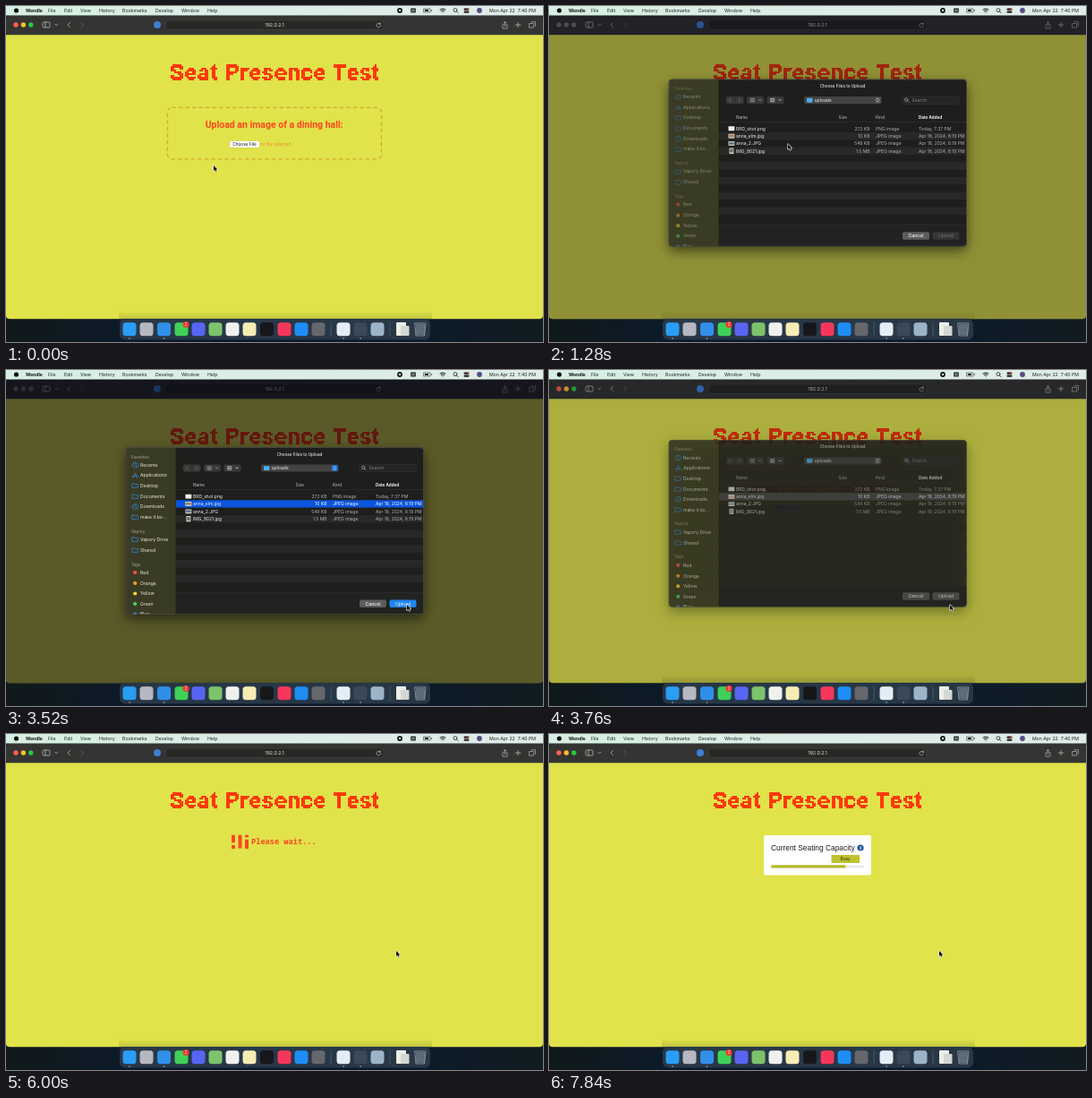
Animation, 600 px wide and 375 px high, one loop 8000 ms. Source, as an HTML page with a canvas:

```html
<!DOCTYPE html>
<html lang="en">
<head>
<meta charset="utf-8">
<title>Upload demo</title>
<style>
html, body { margin: 0; width: 100%; height: 100%; overflow: hidden; background: #0c1622; }
canvas { display: block; width: 600px; height: 375px; }
</style>
</head>
<body>
<canvas id="stage"></canvas>
<script>
const W = 600, H = 375, LOOP = 8000;
const OPEN = 1040, SELECT = 2400, CLOSE = 3640, WAIT = 4160, RESULT = 7360;
const UI = 'Inter, sans-serif', RED = '#fc3a0c', PAGE = '#e1e34b';
const cv = document.getElementById('stage'), c = cv.getContext('2d');
const dpr = window.devicePixelRatio || 1;
cv.width = W * dpr;
cv.height = H * dpr;

const clamp = v => Math.max(0, Math.min(1, v));
const ease = v => v * v * (3 - 2 * v);

function rect(x, y, w, h, fill, r = 0) {
  c.beginPath();
  c.roundRect(x, y, w, h, r);
  c.fillStyle = fill;
  c.fill();
}
function dot(x, y, r, fill) {
  c.beginPath();
  c.arc(x, y, r, 0, 7);
  c.fillStyle = fill;
  c.fill();
}
function path(d, color, x = 0, y = 0, w = .8) {
  c.save();
  c.translate(x, y);
  c.strokeStyle = color;
  c.lineWidth = w;
  c.lineCap = c.lineJoin = 'round';
  c.stroke(new Path2D(d));
  c.restore();
}
function text(s, x, y, size, fill, align = 'left', weight = 400, font = UI) {
  c.font = `${weight} ${size}px ${font}`;
  c.textAlign = align;
  c.fillStyle = fill;
  c.fillText(s, x, y);
}

// Heading: text set at half size, hardened to whole cells, shown doubled
function makeHeading() {
  const o = document.createElement('canvas');
  o.width = 130;
  o.height = 17;
  const g = o.getContext('2d');
  g.font = '700 13.5px Roboto, sans-serif';
  g.textAlign = 'center';
  g.fillStyle = RED;
  g.fillText('Seat Presence Test', 65, 11);
  const img = g.getImageData(0, 0, o.width, o.height);
  for (let i = 3; i < img.data.length; i += 4) img.data[i] = img.data[i] > 125 ? 255 : 0;
  g.putImageData(img, 0, 0);
  return o;
}
const heading = makeHeading();

function desktop() {
  const g = c.createLinearGradient(0, 0, W, 0);
  g.addColorStop(0, '#10191a');
  g.addColorStop(.25, '#0c1a2b');
  g.addColorStop(.75, '#0c1a2b');
  g.addColorStop(1, '#111c20');
  rect(0, 0, W, H, g);
}

function menuBar() {
  const g = c.createLinearGradient(0, 0, W, 0);
  g.addColorStop(0, '#d6efe2');
  g.addColorStop(1, '#e0ece8');
  rect(0, 0, W, 10.5, g);
  dot(11.5, 5, 2.6, '#111');
  text('Wendle', 22, 7, 5.1, '#111', 'left', 700);
  [['File', 47], ['Edit', 65], ['View', 83], ['History', 104], ['Bookmarks', 130],
   ['Develop', 167], ['Window', 196], ['Help', 225]].forEach(([s, x]) => text(s, x, 7, 5.2, '#1b211f'));
  dot(440, 5, 2.9, '#161a19');
  rect(439, 4, 2, 2, '#e0ece8');
  rect(452, 2.5, 6, 5, '#222', 1);
  path('M1 1.8H5M1 3.4H5', '#e0ece8', 452, 2.5, .6);
  path('M0 0H7V4H0Z M8.5 1.3V2.7', '#333', 467, 3, .6);
  rect(468, 4, 4, 2, '#222');
  path('M-3 -2Q0 -4.4 3 -2M-1.8 -.4Q0 -2 1.8 -.4M0 1.2V1.3', '#151515', 488, 6, 1);
  path('M4 2A2 2 0 1 1 0 2A2 2 0 1 1 4 2M3.5 3.5L5.2 5.2', '#222', 500, 2.6);
  rect(511.5, 2.5, 6, 2.3, '#222', 1.2);
  rect(511.5, 5.5, 6, 2.3, '#222', 1.2);
  dot(516.2, 3.6, 1, '#e33');
  dot(529, 5, 2.9, '#5b4a86');
  text('Mon Apr 22  7:40 PM', 592, 7, 5.2, '#1b211f', 'right');
}

function toolbar(active) {
  rect(0, 10.5, W, 23, '#343432', [4, 4, 0, 0]);
  ['#ff5f57', '#febc2e', '#28c840'].forEach((f, i) => dot(11 + i * 8.4, 21, 2.7, active ? f : '#77776f'));
  const ink = '#b7b7b3';
  path('M0 1Q0 0 1 0H7Q8 0 8 1V5Q8 6 7 6H1Q0 6 0 5Z M3 0V6', ink, 41, 18);
  path('M0 0L1.4 1.4L2.8 0', ink, 55, 20.4);
  path('M2.5 0L0 2.5L2.5 5', ink, 69, 18.5);
  path('M0 0L2.5 2.5L0 5', '#666663', 84, 18.5);
  dot(169, 21, 4, '#3d7fd6');
  rect(178, 15.8, 244, 10.6, '#454542', 3);
  rect(178.5, 16.3, 243, 9.6, '#282826', 2.6);
  text('192.0.2.1', 300, 23, 5.3, '#e8e8e4', 'center');
  path('M4 1A2.3 2.3 0 1 0 4.6 2.8M4.3 -.5V1.2H2.6', ink, 414, 19, .7);
  path('M1 2H0V6.5H5V2H4M2.5 4V-1M1 .3L2.5 -1.2L4 .3', ink, 555, 18.6, .7);
  path('M-2.7 0H2.7M0 -2.7V2.7', ink, 572, 21, .8);
  path('M0 0H4.6V4.6H0ZM2 -1.8H6.5V2.8', ink, 585, 19.5, .7);
}

function uploadForm(pressed) {
  c.setLineDash([4.5, 3]);
  c.strokeStyle = '#d0ac2c';
  c.lineWidth = 1.3;
  c.beginPath();
  c.roundRect(180.5, 113.3, 239, 57.5, 5);
  c.stroke();
  c.setLineDash([]);
  text('Upload an image of a dining hall:', 299.7, 135.5, 10.5, '#fb4722', 'center', 700, 'Roboto, sans-serif');
  rect(249.8, 150.6, 33.5, 7.8, '#c9c94a', 2);
  rect(250, 150.8, 33, 7.2, pressed ? '#8ea6ff' : '#fff', 1.8);
  text('Choose File', 266.5, 156.2, 4.8, '#111', 'center');
  text('no file selected', 284.5, 156.2, 4.7, '#f5802a');
}

// Three bars, each split by a gap that travels along it
function waiting(t) {
  for (let i = 0; i < 3; i++) {
    const x = 252 + i * 7.5, phase = (t / 1000 + .6 + i / 3) % 1;
    rect(x, 112.7, 4, 15.4, '#fb4722');
    c.save();
    c.beginPath();
    c.rect(x - .5, 112, 5, 17);
    c.clip();
    rect(x - .5, 110.2 + phase * 18.5, 5, 2.6, PAGE);
    c.restore();
  }
  text('Please wait...', 274, 123.2, 8.67, '#fb4722', 'left', 700, '"Noto Sans Mono", monospace');
}

function result() {
  rect(240, 113, 120, 44.5, '#fff', 2);
  text('Current Seating Capacity', 248, 130, 8.4, '#1c1c1c', 'left', 400, '"Liberation Sans", sans-serif');
  dot(348, 127, 3.6, '#245a9e');
  text('i', 348, 129.3, 6, '#fff', 'center', 700, '"Liberation Serif", serif');
  rect(315.5, 135, 31.5, 9, '#c0c12f', .6);
  text('Busy', 331.2, 141.2, 4.8, '#33330f', 'center');
  rect(248, 146.2, 104, 3.4, '#ececec', 1.5);
  rect(248, 146.2, 83.3, 3.4, '#b8ba2c', [1.5, 0, 0, 1.5]);
}

function browser(t, dim, active) {
  toolbar(active);
  rect(0, 32.3, W, 317, PAGE, [0, 0, 4, 4]);
  c.imageSmoothingEnabled = false;
  c.drawImage(heading, 170, 61, 260, 34);
  if (t < WAIT) uploadForm(t > OPEN);
  else if (t < RESULT) waiting(t);
  else result();
  if (dim > 0) rect(0, 10.5, W, 338.8, `rgba(0,0,18,${dim})`, 4);
}

const DOCK = [
  [138, '#2a9df4'], [157, '#b5b8c2'], [176.5, '#2f8fe8'], [196, '#3ed158'], [215, '#5865f2'],
  [234, '#7cc36b'], [253, '#f0f0ee'], [272, '#f6ecb4'], [291.5, '#17171a'], [311, '#f5365c'],
  [330, '#1f8df5'], [349, '#66676d'], [377, '#e4edf5'], [396, '#3a4858'], [415, '#9db4c8']
];
function dock() {
  const g = c.createLinearGradient(0, 340, 0, 350);
  g.addColorStop(0, 'rgba(60,70,20,0)');
  g.addColorStop(1, 'rgba(60,70,20,.22)');
  rect(126, 340, 350, 9.3, g);
  rect(127, 349, 347, 23.5, '#273746', 6);
  DOCK.forEach(([x, f]) => rect(x - 7.5, 353.3, 15, 15, f, 3.5));
  dot(201, 355.5, 3.6, '#f03a30');
  text('2', 201, 357, 4.2, '#fff', 'center');
  rect(362.7, 353, .7, 16, '#55636f');
  rect(428.7, 353, .7, 16, '#55636f');
  rect(436, 353, 11, 15, '#eceee8', 1);
  rect(441, 357, 9.5, 11, '#d4d8d2', 1);
  path('M-6 -7H6L4.5 7H-4.5Z', '#9aa3aa', 463, 361);
  rect(458, 355, 10, 12, 'rgba(160,170,178,.45)', 1);
  [138, 176.5, 377, 396].forEach(x => dot(x, 371, .7, '#c8d0d6'));
}

const SIDE = [
  [97, 'Favorites'], [106, 'Recents', 0], [117.5, 'Applications', 1], [129, 'Desktop', 2],
  [141, 'Documents', 2], [152.5, 'Downloads', 0], [164, 'make it bo...', 2], [180, 'Vapory'],
  [189, 'Vapory Drive', 2], [201, 'Shared', 2], [217, 'Tags'], [226, 'Red', '#ff5147'],
  [238, 'Orange', '#ff9a2a'], [249.5, 'Yellow', '#ffd52e'], [261, 'Green', '#4fd45a'], [272.5, 'Blue', '#2f8cff']
];
const ICONS = ['M0 3A3 3 0 1 0 6 3A3 3 0 1 0 0 3M3 1.3V3.2L4.2 4', 'M.6 5.8L3 .4L5.4 5.8M0 4H6', 'M0 .8H2.4L3 1.6H6V5.4H0Z'];
const FILES = [
  ['BRD_shot.png', '272 KB', 'PNG image', 'Today, 7:37 PM'],
  ['anna_elm.jpg', '10 KB', 'JPEG image', 'Apr 18, 2024, 8:19 PM'],
  ['anna_2.JPG', '549 KB', 'JPEG image', 'Apr 18, 2024, 8:19 PM'],
  ['IMG_9021.jpg', '1.5 MB', 'JPEG image', 'Apr 18, 2024, 8:19 PM']
];

function sidebar(ready) {
  rect(134, 86.5, 56, 186, '#3a3b24');
  c.save();
  if (!ready) c.globalAlpha *= .45;
  SIDE.forEach(([y, s, mark]) => {
    if (mark === undefined) return text(s, 140, y + 1.5, 4.4, '#8d8e78', 'left', 600);
    if (typeof mark === 'string') dot(144.2, y, 2.1, mark);
    else path(ICONS[mark], '#2f8cf0', 141.3, y - 3, .7);
    text(s, 150, y + 1.8, 5.1, '#eeeee2');
  });
  c.restore();
}

function fileList(picked, focus) {
  text('Name', 209, 130, 4.7, '#c4c4c2');
  text('Size', 333, 130, 4.7, '#c4c4c2', 'right');
  text('Kind', 365, 130, 4.7, '#c4c4c2');
  text('Date Added', 413, 130, 4.6, '#f0f0ee', 'left', 700);
  rect(190, 133.6, 277, .5, '#353534');
  const row = 8.35;
  for (let i = 0; i < 13; i++) {
    const y = 136.9 + i * row;
    if (i % 2) rect(190, y, 277, row, '#282827');
    if (i === 1 && picked) rect(190, y, 277, row, focus ? '#0a55dc' : '#4a4a48');
    const f = FILES[i];
    if (!f) continue;
    const on = picked && i === 1, ink = on ? '#fff' : '#b4b4b2', b = y + 6;
    if (i === 3) {
      rect(201.5, y + 1, 4.8, 6.3, '#dad6c8', .5);
      rect(202.3, y + 2, 3.2, 4, '#6c675c');
    } else {
      rect(200.5, y + 1.8, 6.8, 4.8, '#f0f0ee', .4);
      if (i) rect(201, y + 2.6, 5.8, 3, i === 1 ? '#a87d55' : '#66737c');
    }
    text(f[0], 209, b, 5, '#f2f2f0');
    text(f[1], 358.5, b, 5, ink, 'right');
    text(f[2], 365, b, 5, ink);
    text(f[3], 413, b, 5, ink);
  }
}

function dialog(dy, alpha, ready, picked, focus) {
  c.save();
  c.globalAlpha = alpha;
  c.translate(0, dy);
  c.save();
  c.shadowColor = 'rgba(0,0,0,.55)';
  c.shadowBlur = 14 * dpr;
  c.shadowOffsetY = 5 * dpr;
  rect(133.7, 86.2, 333, 186.6, '#1d1d1c', 4);
  c.restore();
  c.save();
  c.beginPath();
  c.roundRect(134, 86.5, 332.5, 186, 4);
  c.clip();
  sidebar(ready);
  rect(190, 86.5, 277, 186, '#1e1e1d');
  rect(189.7, 86.5, .6, 186, '#111110');
  text('Choose Files to Upload', 328, 95.6, 4.6, '#e8e8e6', 'center', 500);
  const ink = '#b5b5b3';
  rect(198, 105.4, 19.5, 8.2, '#393938', 1.8);
  rect(207.6, 106, .5, 7, '#1e1e1d');
  path('M1.7 0L0 1.8L1.7 3.6M11 0L12.7 1.8L11 3.6', '#7c7c7a', 201.2, 107.7, .7);
  rect(221, 105.4, 19, 8.2, '#393938', 1.8);
  path('M0 0H4.5M0 1.7H4.5M0 3.4H4.5M9.4 1L10.6 2.3L11.8 1', ink, 225, 107.8, .7);
  rect(243.5, 105.4, 19, 8.2, '#393938', 1.8);
  path('M0 0H4.5M0 1.7H4.5M0 3.4H4.5M9.4 1L10.6 2.3L11.8 1', ink, 247.4, 107.8, 1);
  rect(285, 105.4, 86.5, 8.2, '#434342', 1.8);
  rect(288, 107.2, 6.4, 4.8, '#49b1ee', .8);
  text('uploads', 296.5, 111.3, 5.1, '#f0f0ee');
  rect(364, 106.3, 6.4, 6.4, ready && focus ? '#1f78e6' : '#555553', 1.4);
  path('M0 1.2L1.2 0L2.4 1.2M0 2.8L1.2 4L2.4 2.8', '#fff', 366, 107.5, .6);
  rect(394.5, 105.2, 64, 8.6, '#393938', 2);
  rect(394.9, 105.6, 63.2, 7.8, '#252524', 1.7);
  path('M3.4 1.7A1.7 1.7 0 1 1 0 1.7A1.7 1.7 0 1 1 3.4 1.7M3 3L4.4 4.4', ink, 397.5, 107.2, .7);
  text('Search', 405.5, 111.3, 5, '#858583');
  fileList(picked, focus);
  rect(190, 248.5, 277, 24, '#222221');
  rect(190, 248.2, 277, .5, '#353534');
  rect(395, 256.5, 30, 8.5, '#5d5d5b', 1.9);
  text('Cancel', 410, 262.5, 5.1, '#fff', 'center', 500);
  rect(428.5, 256.5, 30, 8.5, !picked ? '#353534' : focus ? '#2085ee' : '#5d5d5b', 1.9);
  text('Upload', 443.5, 262.5, 5.1, picked ? '#fff' : '#777775', 'center');
  c.restore();
  c.beginPath();
  c.roundRect(134, 86.5, 332.5, 186, 4);
  c.strokeStyle = '#5a5a50';
  c.lineWidth = .6;
  c.stroke();
  c.restore();
}

// Pointer stops: time, x, y
const STOPS = [[80, 232, 178], [720, 267, 154], [1360, 267, 154], [1840, 242, 152], [2240, 232, 150.5],
  [2720, 232, 150.5], [3360, 448, 262], [3840, 448, 262], [4240, 436, 242]];
function pointer(t) {
  let [, x, y] = STOPS[0];
  for (let i = 1; i < STOPS.length; i++) {
    const [t0, x0, y0] = STOPS[i - 1], [t1, x1, y1] = STOPS[i];
    if (t < t0) break;
    const k = ease(clamp((t - t0) / (t1 - t0)));
    x = x0 + (x1 - x0) * k;
    y = y0 + (y1 - y0) * k;
  }
  const d = 'M0 0V6L1.4 4.8L2.4 7L3.4 6.5L2.4 4.4H4.3Z';
  path(d, '#f4f4f4', x, y, 1.1);
  c.save();
  c.translate(x, y);
  c.fillStyle = '#080808';
  c.fill(new Path2D(d));
  c.restore();
}

function draw(t) {
  c.setTransform(dpr, 0, 0, dpr, 0, 0);
  const p = clamp((t - OPEN) / 400), q = clamp((t - CLOSE) / 200);
  const closing = q > 0, shown = p > 0 && q < 1;
  desktop();
  browser(t, .6 * p * (1 - q), !shown || closing);
  dock();
  menuBar();
  if (shown) {
    const dy = closing ? -13.5 * q : -11 * (1 - p);
    const alpha = closing ? 1 - q * q : Math.min(1, p * 2);
    dialog(dy, alpha, p === 1, t >= SELECT, !closing);
  }
  pointer(t);
}

function tick() {
  draw(performance.now() % LOOP);
  requestAnimationFrame(tick);
}
tick();
</script>
</body>
</html>
```
